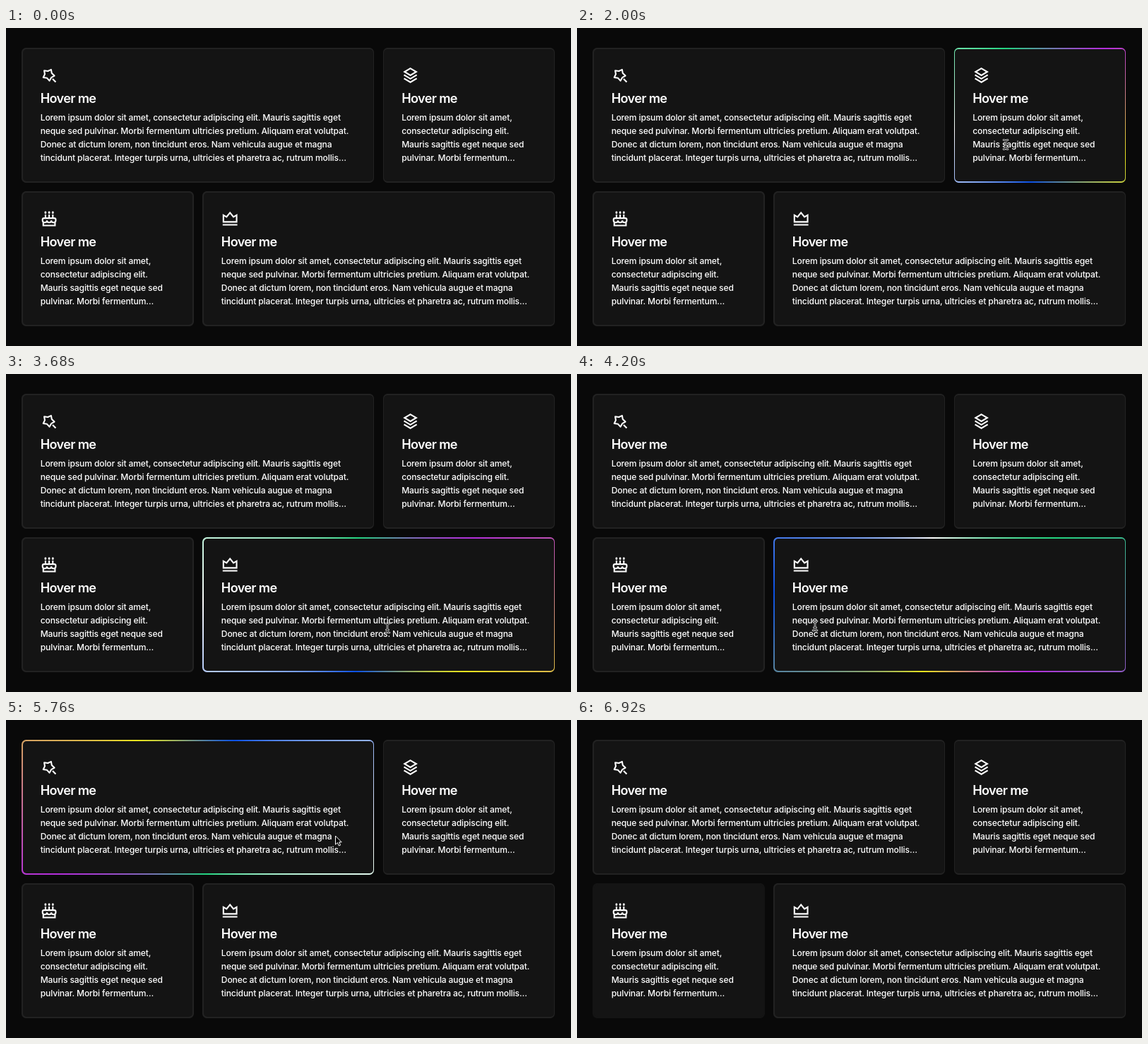
An HTML page that plays this animation: 800 px wide and 450 px high, repeating every 6960 ms.

```html
<!DOCTYPE html>
<html lang="en">
<head>
<meta charset="utf-8">
<title>Hover cards</title>
<style>
  html, body { margin: 0; width: 100%; height: 100%; overflow: hidden; background: #090909; }
  .card, .card i, svg { position: absolute; }
  .card { border-radius: 6.5px; background: #141414; }
  .card i { inset: 0; border-radius: 6.5px; }
  .card .edge { background: #222; }
  .card .glow { opacity: 0; }
  .card .face { inset: 1.6px; border-radius: 5px; background: #141414; }
  svg { left: 0; top: 0; }
  text { font-family: Inter, Roboto, "Liberation Sans", sans-serif; fill: #fff; font-size: 12.1px; font-weight: 500; letter-spacing: -.14px; }
  .title { font-size: 18.1px; font-weight: 600; letter-spacing: -.65px; }
  .icon { fill: none; stroke: #fff; stroke-width: 2; }
  .solid { fill: #fff; stroke: none; }
</style>
</head>
<body>
<svg id="art" width="800" height="450" viewBox="0 0 800 450">
  <defs>
    <path id="caret" d="M-3 -6.5Q0 -6.5 0 -4.5Q0 -6.5 3 -6.5M0 -4.5V4.5M-3 6.5Q0 6.5 0 4.5Q0 6.5 3 6.5M-1.5 2.5H1.5"/>
  </defs>
  <g id="cursor">
    <path id="arrow" d="M0 0V12.2L2.9 9.5L4.9 14L7 13.1L5.1 8.8H8.7Z" fill="#000" stroke="#fff"/>
    <g id="beam" fill="none" stroke-linecap="round">
      <use href="#caret" stroke="#ddd" stroke-width="2.6"/>
      <use href="#caret" stroke="#111"/>
    </g>
  </g>
</svg>
<script>
const LOOP = 6960, STEP = 40, TURN = 2500, START_ANGLE = -14;
const COLORS = '#b42ddb, #e8e41c, #0a50e4, #fff, #22d480, #b42ddb';
const CARD_H = 190.6, LINE_H = 18.7;
const $ = id => document.getElementById(id);
const clamp = v => Math.max(0, Math.min(1, v));
const inside = (b, x, y) => x >= b.x && x <= b.x + b.w && y >= b.y && y < b.y + b.h;

const wide = [
  'Lorem ipsum dolor sit amet, consectetur adipiscing elit. Mauris sagittis eget',
  'neque sed pulvinar. Morbi fermentum ultricies pretium. Aliquam erat volutpat.',
  'Donec at dictum lorem, non tincidunt eros. Nam vehicula augue et magna',
  'tincidunt placerat. Integer turpis urna, ultricies et pharetra ac, rutrum mollis…'
];
const narrow = [
  'Lorem ipsum dolor sit amet,',
  'consectetur adipiscing elit.',
  'Mauris sagittis eget neque sed',
  'pulvinar. Morbi fermentum…'
];

const star = '<path stroke-linejoin="round" d="M14.7 4L15.6 9L19.2 12.4L14.9 14.9L12.4 19.2L9.1 15.5L4 14.7L6.1 10.3L5.3 5.3L10.3 6.1ZM16.7 16.7L21 21"/>';
const stack = '<path d="M12 2.3L4 7L12 11.8L20 7Z"/>' +
  [11.3, 16].map(y => `<path d="M3.3 ${y}l8.7 5.2l8.7 -5.2"/>`).join('');
const cake = '<path d="M5 11H19a2 2 0 0 1 2 2v1a3 2.8 0 0 1-6 0a3 2.8 0 0 1-6 0a3 2.8 0 0 1-6 0v-1a2 2 0 0 1 2-2ZM4 16V21H20V16"/>' +
  [7, 12, 17].map(x => `<path d="M${x} 6V10.5"/><ellipse class="solid" cx="${x}" cy="3.2" rx="1.4" ry="1.8"/>`).join('');
const crown = '<path class="solid" fill-rule="evenodd" d="M2 19H22V21H2ZM2 5L7 8L12 2L17 8L22 5V17H2ZM4 8.4V15H20V8.4L16.5 10.6L12 5.2L7.5 10.6Z"/>';

const left = 22.3, right = 777.2, small = 243.4, big = 498.8, top1 = 28.2, top2 = 231.2;
const cards = [
  { x: left, y: top1, w: big, lines: wide, icon: star },
  { x: right - small, y: top1, w: small, lines: narrow, icon: stack },
  { x: left, y: top2, w: small, lines: narrow, icon: cake },
  { x: right - big, y: top2, w: big, lines: wide, icon: crown }
];

// key points of the cursor's route: time, x, y
const route = [
  [120, 58, 34], [1000, 101.5, 142.5], [1580, 527, 156], [2000, 607, 165], [2600, 700, 150],
  [3170, 600, 225], [3680, 540, 359.5], [4370, 272, 350], [4720, 186, 342], [5370, 240, 225],
  [5760, 466.5, 164], [5830, 527, 165], [6100, 650, 225], [6520, 272, 362], [6690, 170, 422]
];
const firstMove = route[0][0], lastMove = route[route.length - 1][0];

// cubic through the route with averaged velocities; null while off stage
function cursorAt(t) {
  if (t < firstMove || t >= lastMove) return null;
  const i = route.findIndex(p => p[0] > t) - 1;
  const a = route[i], b = route[i + 1], span = b[0] - a[0], u = (t - a[0]) / span;
  const speed = (k, axis) => {
    const p = route[Math.max(0, k - 1)], q = route[Math.min(route.length - 1, k + 1)];
    return (q[axis] - p[axis]) / (q[0] - p[0]) * span;
  };
  return [1, 2].map(n => {
    const va = speed(i, n), vb = speed(i + 1, n), d = b[n] - a[n];
    return a[n] + u * (va + u * (3 * d - 2 * va - vb + u * (va + vb - 2 * d)));
  });
}

// [enter, leave] times, found by following the cursor over the card
function findHovers(card) {
  const hovers = [];
  let over = false;
  for (let t = 0; t < LOOP; t += 5) {
    const p = cursorAt(t), now = !!p && inside(card, ...p);
    if (now && !over) hovers.push([t, LOOP]);
    if (!now && over) hovers[hovers.length - 1][1] = t;
    over = now;
  }
  return hovers;
}

const art = $('art'), cursor = $('cursor'), lineBoxes = [];

function addText(str, x, y, h, cls = '') {
  const el = document.createElementNS(art.namespaceURI, 'text');
  el.setAttribute('x', x);
  el.setAttribute('y', y);
  el.setAttribute('class', cls);
  el.textContent = str;
  art.insertBefore(el, cursor);
  lineBoxes.push({ x, y: y - h * .72, h, w: el.getComputedTextLength() });
}

for (const c of cards) {
  c.h = CARD_H;
  c.hovers = findHovers(c);
  const el = document.createElement('div');
  el.className = 'card';
  el.style.cssText = `left:${c.x}px;top:${c.y}px;width:${c.w}px;height:${c.h}px`;
  el.innerHTML = '<i class="edge"></i><i class="glow"></i><i class="face"></i>';
  document.body.insertBefore(el, art);
  [c.edge, c.glow] = el.children;
  const x = c.x + 26.4;
  cursor.insertAdjacentHTML('beforebegin',
    `<g class="icon" transform="translate(${x - .1} ${c.y + 26.5}) scale(1.04)">${c.icon}</g>`);
  addText('Hover me', x, c.y + 77.4, 26, 'title');
  c.lines.forEach((s, i) => addText(s, x, c.y + 103.2 + i * LINE_H, LINE_H));
}

// the glow only turns while hovered, and goes on from where it stopped
function drawCard(c, t) {
  let glow = 0, edge = 1, run = 0;
  for (const [enter, leave] of c.hovers) {
    if (t < enter) break;
    const held = Math.min(t, leave) - enter, gone = t - leave, shown = clamp(held / 160);
    run += held;
    glow = gone < 0 ? shown : shown * (1 - clamp(gone / 200));
    edge = gone < 0 ? 1 - shown : clamp((gone - 230) / 100);
  }
  c.edge.style.opacity = edge;
  c.glow.style.opacity = glow;
  c.glow.style.background = `conic-gradient(from ${START_ANGLE + run / TURN * 360}deg, ${COLORS})`;
}

function drawCursor(t) {
  const p = cursorAt(t);
  cursor.style.display = p ? '' : 'none';
  if (!p) return;
  const overText = lineBoxes.some(b => inside(b, ...p));
  cursor.setAttribute('transform', `translate(${p})`);
  $('beam').style.display = overText ? '' : 'none';
  $('arrow').style.display = overText ? 'none' : '';
}

const start = performance.now();
function frame() {
  const t = Math.floor((performance.now() - start) % LOOP / STEP) * STEP;
  cards.forEach(c => drawCard(c, t));
  drawCursor(t);
  requestAnimationFrame(frame);
}
frame();
</script>
</body>
</html>
```
